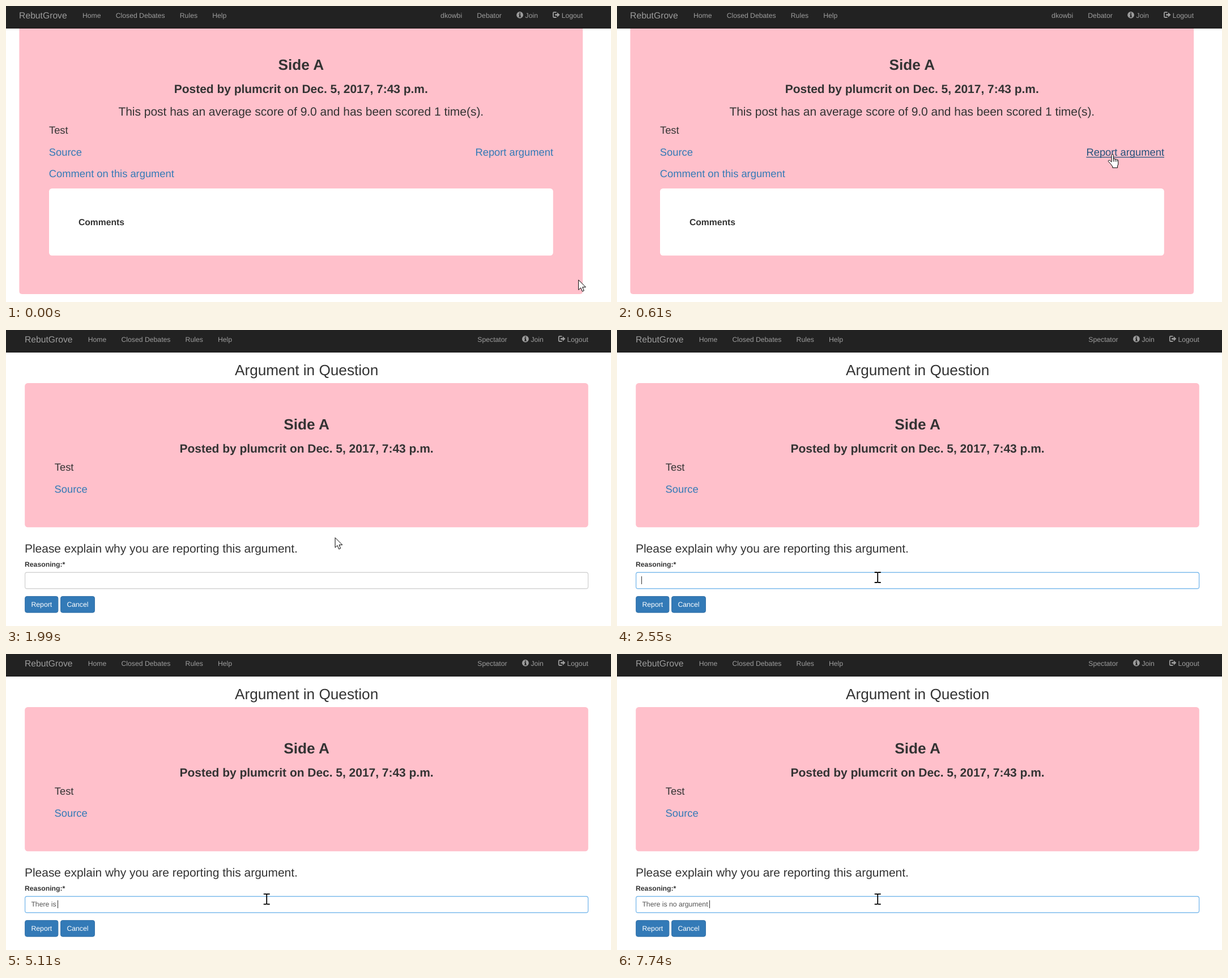
An HTML page that plays this animation: 1068 px wide and 524 px high, repeating every 8 s.

```html
<!DOCTYPE html>
<html lang="en">
<head>
<meta charset="utf-8">
<title>Report an argument</title>
<style>
  html, body { margin: 0; width: 100%; height: 100%; overflow: hidden; background: #fff; }
  svg { display: block; width: 100vw; height: 100vh; }
  text { font-family: "Liberation Sans", Arial, sans-serif; fill: #333; white-space: pre; text-rendering: geometricPrecision; }
  .nav text { fill: #9d9d9d; }
  .link { fill: #337ab7; }
  .button rect { fill: #337ab7; stroke: #2e6da4; stroke-width: .9; }
  .button text { fill: #fff; }
  .cursor path { stroke: #000; stroke-linejoin: round; fill: #fff; }
</style>
</head>
<body>
<svg id="stage" viewBox="0 0 1068 524"></svg>
<script>
const LOOP = 8000;
const PAGE_CHANGE = 1460;
const FOCUS = 2376;
const SHIFT = 9.8;               // the second page has no scrollbar
const SIZE = { small: 12.22, h4: 15.7, body: 18.33, h3: 20.95, h2: 26.2 };
const PINK = '#ffc0cb';

const stage = document.getElementById('stage');
const $ = id => document.getElementById(id);

const text = (x, y, size, content, attrs = '') =>
  `<text x="${x}" y="${y}" font-size="${SIZE[size]}" ${attrs}>${content}</text>`;
const centred = (y, size, content, bold) =>
  text(520.8, y, size, content, `text-anchor="middle"${bold ? ' font-weight="700"' : ''}`);
const box = (x, y, w, h, fill) =>
  `<rect x="${x}" y="${y}" width="${w}" height="${h}" rx="5.2" fill="${fill}"/>`;
const navItem = (x, label) => text(x, 20.9, 'small', label);
const button = (x, w, label) => `<g class="button">
  <rect x="${x}" y="471.6" width="${w}" height="28.6" rx="3.4"/>
  ${text(x + 10.9, 489.8, 'small', label)}</g>`;

const icons = `
  <circle cx="907.1" cy="15.9" r="5.9" fill="#9d9d9d"/>
  <path d="M906 11.8h2.3v1.7H906zM905.2 14.6h3.1v4h.9v1.2h-4v-1.2h.9v-2.8h-.9z" fill="#222"/>
  <path d="M971.6 11.2H967.2Q966 11.2 966 12.4V18.8Q966 20 967.2 20H971.6" fill="none" stroke="#9d9d9d" stroke-width="1.8"/>
  <path d="M969.2 14.2H973V11.2L977.6 15.6L973 20V17H969.2Z" fill="#9d9d9d"/>`;

const navBar = (shift, account) => `
  <rect width="1068" height="39.6" fill="#222"/>
  <rect y="38.7" width="1068" height=".9" fill="#080808"/>
  <g class="nav" transform="translate(${shift})">
    ${text(23.1, 22.4, 'h4', 'RebutGrove')}
    ${navItem(134.9, 'Home')}${navItem(193.7, 'Closed Debates')}
    ${navItem(306.8, 'Rules')}${navItem(364.2, 'Help')}
    ${account}${icons}
    ${navItem(916.6, 'Join')}${navItem(980.7, 'Logout')}
  </g>`;

const posted = 'Posted by plumcrit on Dec. 5, 2017, 7:43 p.m.';

const debatePage = `<g id="debate">
  <path d="M23.4 39H1018.2V504.8Q1018.2 510 1013 510H28.6Q23.4 510 23.4 504.8Z" fill="${PINK}"/>
  ${centred(112.8, 'h2', 'Side A', true)}
  ${centred(154, 'h3', posted, true)}
  ${centred(194, 'h3', 'This post has an average score of 9.0 and has been scored 1 time(s).')}
  ${text(76, 226.2, 'body', 'Test')}
  ${text(75.8, 264.9, 'body', 'Source', 'class="link"')}
  <g id="reportLink">
    ${text(966, 264.9, 'body', 'Report argument', 'text-anchor="end"')}
    <path id="underline" d="M828.4 267.6H966" stroke="#23527c" stroke-width="1.1"/>
  </g>
  ${text(75.8, 303.3, 'body', 'Comment on this argument', 'class="link"')}
  ${box(76, 323, 889.8, 118.8, '#fff')}
  ${text(127.9, 388.4, 'h4', 'Comments', 'font-weight="700"')}
  ${navBar(0, navItem(767.1, 'dkowbi') + navItem(831.3, 'Debator'))}
</g>`;

const reportPage = `<g id="report">
  <g transform="translate(${SHIFT})">
    ${centred(80, 'h2', 'Argument in Question')}
    ${box(23.4, 94, 994.6, 255.3, PINK)}
    ${centred(176.4, 'h2', 'Side A', true)}
    ${centred(217.3, 'h3', posted, true)}
    ${text(76, 249.2, 'body', 'Test')}
    ${text(75.8, 287.6, 'body', 'Source', 'class="link"')}
  </g>
  ${text(33, 393.5, 'h3', 'Please explain why you are reporting this argument.')}
  ${text(33, 419.3, 'small', 'Reasoning:*', 'font-weight="700"')}
  <rect id="field" x="33.6" y="429.1" width="994" height="28.8" rx="3.4" fill="#fff" stroke-width="1.1"/>
  ${text(44.4, 447.3, 'small', '', 'id="typed" style="fill:#555"')}
  <rect id="caret" y="436" width="1" height="14" fill="#333"/>
  ${button(33.6, 58.3, 'Report')}${button(96.5, 60, 'Cancel')}
  ${navBar(SHIFT, navItem(822.5, 'Spectator'))}
</g>`;

// Each cursor is drawn around its hot spot.
const cursors = `<g id="cursor" class="cursor">
  <path id="arrow" d="M0 0V17.5L4 13.8L6.6 20.2L9.6 19L7 12.7H12.7Z"/>
  <g id="hand" transform="translate(-8.7 -.3)">
    <path d="M7 2.5Q7 .6 8.7 .6T10.4 2.5V9.5Q10.6 8.2 12 8.3T13.4 9.8Q13.8 8.9 15 9.1T16.4 10.6Q17 9.9 18 10.3T18.8 12V17Q18.8 19 17.6 21V24.3H8.8V22Q6.8 20 5.5 17.5L1.6 13.6Q.6 12 2 11.3T4.6 12L7 14.2Z"/>
    <path d="M10.4 9.5V13.6M13.4 10V13.6M16.4 11V13.6" style="fill:none"/>
  </g>
  <path id="beam" d="M-5.5 -9H-1.4L0 -8.4L1.4 -9H5.5M0 -8.4V8.4M-5.5 9H-1.4L0 8.4L1.4 9H5.5" stroke-width="1.8" style="fill:none"/>
</g>`;

stage.innerHTML = `<rect width="1068" height="524" fill="#fff"/>${debatePage}${reportPage}${cursors}`;

const show = (id, on) => $(id).setAttribute('visibility', on ? 'inherit' : 'hidden');
const mix = (a, b, p) => a + (b - a) * p;
const clamp = p => Math.min(1, Math.max(0, p));
const mixColor = (a, b, p) => `rgb(${a.map((v, i) => Math.round(mix(v, b[i], p)))})`;
const ease = p => p * p * (3 - 2 * p);

// Progress that advances in equal jumps, the first one at `start`, the last at `end`.
const stepped = (t, start, end, count) =>
  t < start ? 0 : clamp((Math.floor((t - start) / (end - start) * (count - 1) + 1e-6) + 1) / count);

// Bursts of typing: [first key, last key, characters].
const BURSTS = [
  [2820, 2820, 'T'], [3010, 3310, 'here'], [3540, 3540, ' '], [3910, 3910, 'i'],
  [4930, 4930, 's'], [5110, 5110, ' '], [5290, 5290, 'n'], [5430, 5850, 'o argu'],
  [6030, 6360, 'ment'], [6680, 6680, ' ']
];
const CARET_OFF = [[4450, 4930], [7250, 7740]];

function typedAt(t) {
  return BURSTS.map(([start, end, chars]) => {
    if (t < start) return '';
    const gap = (end - start) / Math.max(1, chars.length - 1);
    return gap ? chars.slice(0, Math.floor((t - start) / gap + 1e-6) + 1) : chars;
  }).join('');
}

function cursorAt(t) {
  if (t < PAGE_CHANGE) {
    const p = ease(stepped(t, 40, 610, 13));
    const y = mix(485, 262.3, p);
    return { x: mix(1010.7, 874.7, p), y, shape: y < 270 ? 'hand' : 'arrow' };
  }
  if (t < 2270) {
    const p = ease(stepped(t, 1514, 2220, 14));
    return { x: mix(874.7, 460.2, p), y: mix(262.3, 411, p), shape: p ? 'arrow' : 'hand' };
  }
  const y = t < 2323 ? 430 : t < 2640 ? 438 : 433.8;
  return { x: 460.2, y, shape: 'beam' };
}

function borderAt(t) {
  const idle = [204, 204, 204];
  return t < FOCUS
    ? mixColor([68, 68, 68], idle, clamp((t - PAGE_CHANGE - 50) / 150))
    : mixColor(idle, [102, 175, 233], clamp((t - FOCUS) / 150));
}

function draw(t) {
  const reporting = t >= PAGE_CHANGE;
  show('debate', !reporting);
  show('report', reporting);

  const { x, y, shape } = cursorAt(t);
  $('cursor').setAttribute('transform', `translate(${x} ${y})`);
  for (const id of ['arrow', 'hand', 'beam']) show(id, id === shape);

  const hover = !reporting && shape === 'hand';
  show('underline', hover);
  $('reportLink').firstElementChild.style.fill = hover ? '#23527c' : '#337ab7';

  $('field').setAttribute('stroke', borderAt(t));
  const typed = $('typed');
  typed.textContent = typedAt(t);
  $('caret').setAttribute('x', Math.round(43.4 + typed.getComputedTextLength()));
  show('caret', t >= FOCUS && !CARET_OFF.some(([from, to]) => t >= from && t < to));
}

const begin = performance.now();
function tick() {
  draw((performance.now() - begin) % LOOP);
  requestAnimationFrame(tick);
}
tick();
</script>
</body>
</html>
```
